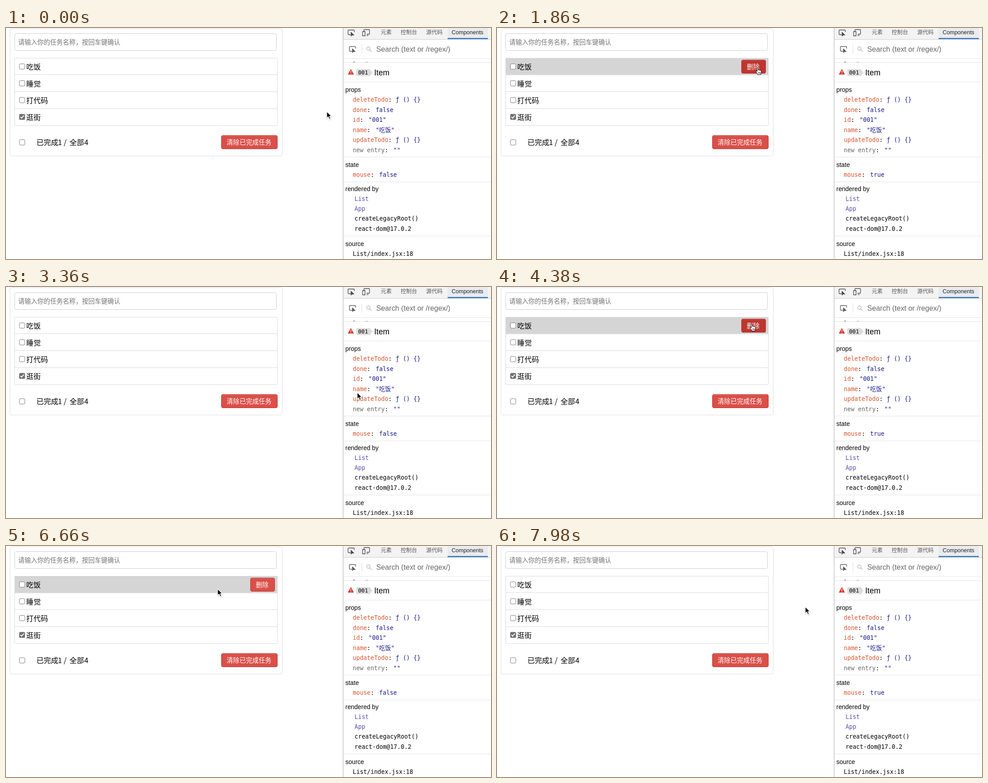
Recreate the animation shown at these times as an HTML page. Size 1084 by 517 pixels, loop 8 s.

```html
<!DOCTYPE html>
<html lang="zh-CN">
<head>
<meta charset="utf-8">
<title>Todo list</title>
<style>
  html, body { margin: 0; width: 100%; height: 100%; overflow: hidden; background: #fff; }
  svg { display: block; width: 1084px; height: 517px; }
  text { white-space: pre; }
  .cjk { font-family: "Noto Sans CJK SC", "Noto Sans CJK", sans-serif; }
  .ui { font-family: "Liberation Sans", "Noto Sans CJK SC", sans-serif; }
  .mono { font-family: "DejaVu Sans Mono", "Noto Sans CJK SC", monospace; }
</style>
</head>
<body>
<svg viewBox="0 0 1084 517">
  <defs><clipPath id="strip"><rect x="755" y="69" width="329" height="8.5"/></clipPath></defs>
  <g id="page"></g>
  <g id="tools"></g>
  <g id="arrow">
    <path d="M0 0V14.6L3.4 11.5 5.8 17 8.4 15.9 6.1 10.6H10.4Z" transform="translate(.5 1.5)" fill="none" stroke="#000" stroke-opacity=".12" stroke-width="2.5"/>
    <path d="M0 0V14.6L3.4 11.5 5.8 17 8.4 15.9 6.1 10.6H10.4Z" stroke="#fff" stroke-width="1.2"/>
  </g>
  <g id="hand">
    <path d="M2.7 1.2C3.8-.2 5.2.6 5.3 2L5.8 6.2C6.6 5.4 8 5.7 8.3 6.7 9.2 6 10.3 6.4 10.6 7.3 12 6.9 12.8 7.6 12.8 9V11.5C12.8 13.4 11.6 14.4 11.6 16.5H5C4.8 14.4 2.4 12.6.8 10.2-.2 8.6 1.5 7.6 2.6 8.7L3.4 9.6Z" fill="#fff" stroke="#000" stroke-linejoin="round"/>
    <path d="M6.6 11V14M8.6 11V14M10.6 11V14" stroke="#000" stroke-width=".9"/>
  </g>
</svg>
<script>
const $ = id => document.getElementById(id);
const text = (cls, x, y, size, fill, str, extra = '') =>
  `<text class="${cls}" x="${x}" y="${y}" font-size="${size}" fill="${fill}" ${extra}>${str}</text>`;
const rect = (x, y, w, h, fill, extra = '') =>
  `<rect x="${x}" y="${y}" width="${w}" height="${h}" fill="${fill}" ${extra}/>`;
const frame = (x, y, w, h, stroke, r) => rect(x, y, w, h, 'none', `stroke="${stroke}" rx="${r}"`);
const path = (d, stroke, width = 1.3, fill = 'none') =>
  `<path d="${d}" fill="${fill}" stroke="${stroke}" stroke-width="${width}"/>`;

// Todo card
const checkbox = (y, on) => on
  ? rect(29.5, y - 6.5, 13, 13, '#6f6f6f', 'rx="2.5"') + path(`M32.3 ${y}l2.6 2.8 5-6`, '#fff', 2)
  : rect(30, y - 6, 12, 12, '#fff', 'stroke="#767676" rx="2.2"');
const button = (x, y, w, label, id) =>
  rect(x + .5, y + .5, w - 1, 30, '#da4f49', `id="${id}" stroke="#bd362f" rx="3.5"`) +
  path(`M${x + 3} ${y + 1.5}h${w - 6}`, '#fff3', 1) +
  text('cjk', x + 12.3, y + 21, 14.3, '#fff', label);

const rowTop = i => 67.5 + i * 37.7;
$('page').innerHTML =
  frame(9, 1.5, 608.5, 285, '#ddd', 4) +
  frame(19.5, 12.5, 585, 38, '#ccc', 4) +
  text('cjk', 27.3, 36.8, 14.25, '#757575', '请输入你的任务名称，按回车键确认') +
  `<g id="hover">${rect(19.5, 67.5, 587.5, 38, '#d5d5d5')}${button(546, 71, 55, '删除', 'del')}</g>` +
  frame(19.5, 67.5, 587, 151, '#d9d9d9', 1) +
  ['吃饭', '睡觉', '打代码', '逛街'].map((name, i) =>
    (i ? path(`M20 ${Math.round(rowTop(i)) - .5}H606`, '#d9d9d9', 1) : '') +
    checkbox(86.2 + i * 37.6, i === 3) +
    text('cjk', 45.3, 93 + i * 37.7, 16.2, '#000', name)).join('') +
  checkbox(256) +
  text('cjk', 68, 262, 16.3, '#000',
    '已完成<tspan x="116">1</tspan><tspan x="129">/</tspan><tspan x="142">全部</tspan><tspan x="175">4</tspan>') +
  button(481, 240, 126, '清除已完成任务', 'clear');

// Inspector panel
const CHAR = 7.94, NAVY = '#1a1a8c', RED = '#d9532c', PURPLE = '#5a4bab';
const mono = (x, y, fill, str, extra) => text('mono', x, y, 13.2, fill, str, extra);
const prop = (y, name, value, color = RED, id = '') => {
  const end = 775 + name.length * CHAR;
  const gap = value[0] === 'ƒ' ? 16.6 : 19.4;
  return mono(775, y, color, name) + mono(end, y, '#000', ':') +
    mono(end + gap, y, NAVY, value, id && `id="${id}"`);
};
const label = (y, str) => text('ui', 758.5, y, 13.9, '#000', str);
const line = y => path(`M754 ${y}H1084`, '#e3e3e3', 1);
const inspect = (x, y, c) =>
  path(`M${x + 6} ${y + 11}H${x + 2}a1.5 1.5 0 0 1-1.5-1.5V${y + 2}a1.5 1.5 0 0 1 1.5-1.5H${x + 13}a1.5 1.5 0 0 1 1.5 1.5V${y + 5}`, c) +
  path(`M${x + 7} ${y + 5}v9.5l2.7-2.5h4.3Z`, c, .8, c);

$('tools').innerHTML =
  rect(754, 0, 330, 25, '#f3f3f3') + rect(987, 0, 90, 25, '#e9ebee') +
  path('M754 25.5H1084', '#ccc', 1) + rect(987, 22.5, 90, 2.2, '#1f66b8') +
  path('M753.5 0V517', '#c4c4c4', 1.5) +
  inspect(764, 4, '#444') +
  path('M800 8V4.5a1 1 0 0 1 1-1h10.5a1 1 0 0 1 1 1V13a1 1 0 0 1-1 1H806M797 8h5.5v9.5H797ZM806 16.8h4', '#444') +
  text('ui', 837.5, 13.5, 12.3, '#5a5a5a', '元素') +
  text('ui', 882, 13.5, 12.3, '#5a5a5a', '控制台') +
  text('ui', 939, 13.5, 12.3, '#5a5a5a', '源代码') +
  text('ui', 996, 13.5, 12.5, '#222', 'Components') +
  inspect(767, 41, '#555') + path('M795.5 37V58', '#ddd', 1) +
  '<circle cx="810" cy="46" r="3.8" fill="none" stroke="#bbb" stroke-width="1.4"/>' +
  path('M813 49l4 4', '#bbb', 1.6) +
  text('ui', 827.5, 53, 16.2, '#666', 'Search (text or /regex/)') +
  line(68.5) +
  `<g clip-path="url(#strip)">${mono(774, 84.5, PURPLE, 'App')}${rect(804, 76, 5, 2, '#aaa')}</g>` +
  line(77.5) +
  path('M770.8 93L776.6 103.5H765Z', '#d83a32', 1.3, '#d83a32') +
  path('M770.8 96v4M770.8 101.3v1.4', '#fff', 1.3) +
  path('M785 92H813L819 99.7 813 107.5H785a2 2 0 0 1-2-2V94a2 2 0 0 1 2-2Z', 'none', 0, '#dcdcdc') +
  text('mono', 787, 104, 12.2, '#000', '001') +
  text('ui', 823, 106, 17.5, '#000', 'Item') +
  line(121) + label(143, 'props') +
  prop(165, 'deleteTodo', 'ƒ () {}') +
  prop(187.8, 'done', 'false') +
  prop(210.2, 'id', '"001"') +
  prop(232.7, 'name', '"吃饭"') +
  prop(255, 'updateTodo', 'ƒ () {}') +
  prop(277.6, 'new entry', '""', '#666') +
  line(288.8) + label(310.5, 'state') +
  prop(333.3, 'mouse', 'false', RED, 'mouse') +
  line(344.6) + label(365.2, 'rendered by') +
  mono(779, 386.7, PURPLE, 'List') + mono(779, 409.2, PURPLE, 'App') +
  mono(779, 431.4, '#000', 'createLegacyRoot()') +
  mono(779, 454, '#000', 'react-dom@17.0.2') +
  line(465.5) + label(487.6, 'source') +
  mono(775, 509.7, '#000', 'List/index.jsx:18');

// Pointer stops: time, x, y
const stops = [
  [0, 717, 187], [840, 842, 338], [1260, 588, 90], [1620, 588, 90], [1860, 578, 88],
  [2460, 850, 338], [2640, 850, 338], [3120, 797, 250], [3300, 797, 250], [3360, 785, 236],
  [3900, 590, 92], [4140, 572, 86], [4380, 565, 82], [4560, 565, 82], [4980, 640, 132],
  [6420, 640, 132], [6540, 592, 98], [6660, 473, 96], [6840, 565, 85], [7260, 565, 85],
  [7980, 689, 136]];
const mouseOn = [[1200, 2700], [4080, 5760], [6780, 8000]];
const STEP = 60, LOOP = 8000;

function pointer(t) {
  const i = Math.max(1, stops.findIndex(s => s[0] >= t));
  const [t0, x0, y0] = stops[i - 1], [t1, x1, y1] = stops[i];
  const u = (t - t0) / (t1 - t0), k = u * u * (3 - 2 * u);
  return [x0 + (x1 - x0) * k, y0 + (y1 - y0) * k];
}
const show = (id, on) => $(id).setAttribute('visibility', on ? 'visible' : 'hidden');

function draw(now) {
  const t = Math.floor(now % LOOP / STEP) * STEP;
  const [x, y] = pointer(t);
  const inRow = x > 20 && x < 607 && y > 68 && y < 105;
  const onButton = inRow && x > 546 && x < 601 && y > 71 && y < 102;
  show('hover', inRow);
  show('arrow', !onButton);
  show('hand', onButton);
  $('del').setAttribute('fill', onButton ? '#bd362f' : '#da4f49');
  $('mouse').textContent = mouseOn.some(([a, b]) => t >= a && t < b) ? 'true' : 'false';
  $('arrow').setAttribute('transform', `translate(${x} ${y})`);
  $('hand').setAttribute('transform', `translate(${x} ${y})`);
}
const start = performance.now();
function tick() {
  draw(performance.now() - start);
  requestAnimationFrame(tick);
}
tick();
</script>
</body>
</html>
```
